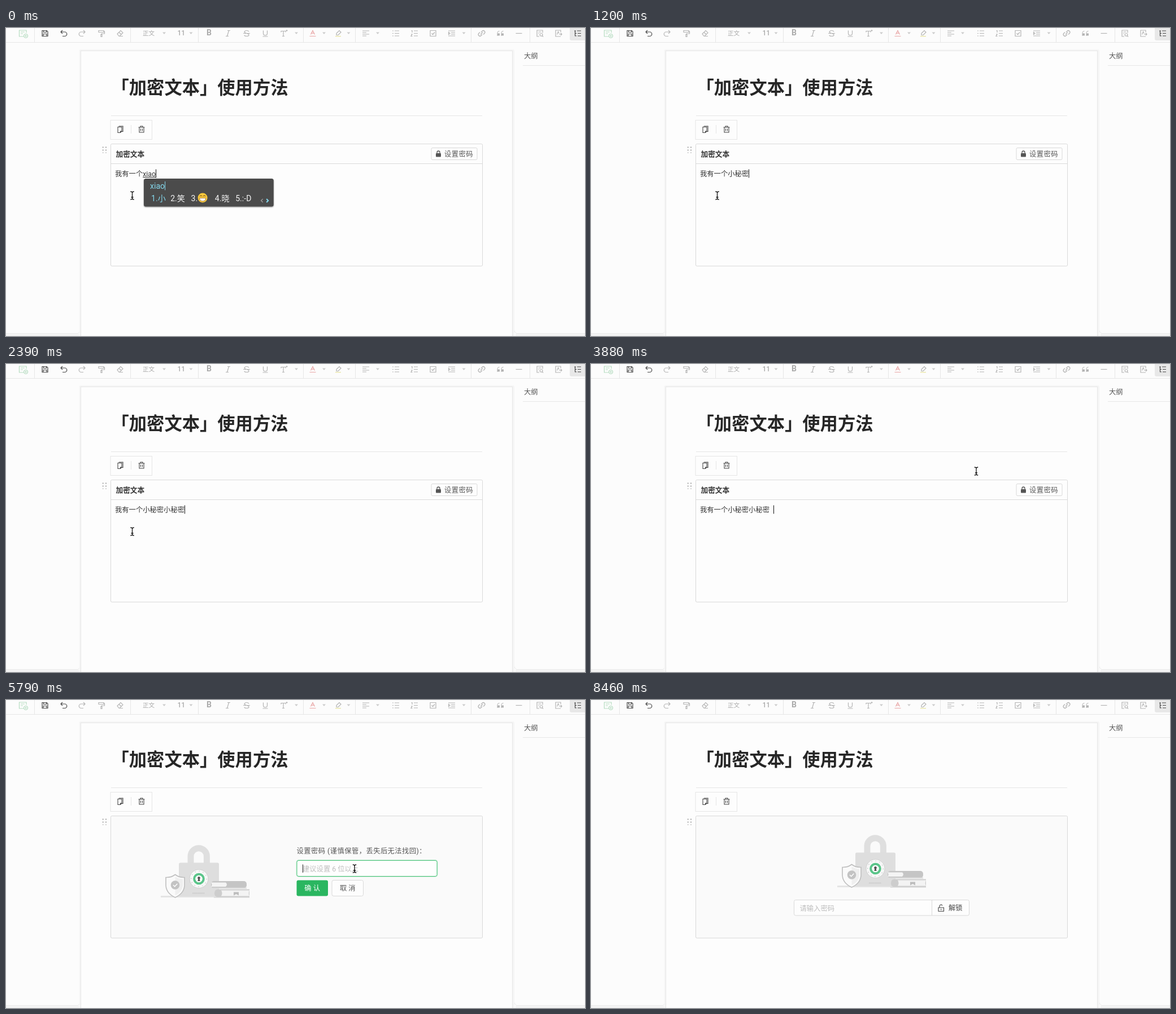
Recreate the animation shown at these times as an HTML page. Size 1025 px wide and 546 px high, loop 9360 ms.

```html
<!DOCTYPE html>
<html lang="zh-CN">
<head>
<meta charset="utf-8">
<style>
html, body { margin: 0; width: 100%; height: 100%; overflow: hidden; background: #fcfcfc; }
svg { display: block; width: 1025px; height: 546px; fill: none;
  font: 12.3px Roboto, "Noto Sans CJK SC", "Noto Sans CJK", sans-serif; }
text { fill: #555; white-space: pre; }
.line { stroke: #e6e6e6; }
.box { stroke: #d9d9d9; }
.dark { stroke: #444; stroke-width: 1.1; }
.hint { fill: #bdbdbd; }
.spaced { letter-spacing: .45px; }
#popup { filter: drop-shadow(0 1px 1px #0007); }
#popup text { font-size: 14.1px; fill: #f6f6f6; }
#popup .on { fill: #85d9ee; }
</style>
</head>
<body>
<svg viewBox="0 0 1025 546">
  <defs>
    <g id="art">
      <path d="M274 348.5H431" stroke="#e4e4e4" stroke-width="3"/>
      <path d="M327 290V277a14.2 14.2 0 0 1 28.4 0V290" stroke="#dfdfdf" stroke-width="11"/>
      <rect x="306" y="288.500" width="71" height="59.500" rx="2.500" fill="#dedede"/>
      <path d="M330 342.500H352" stroke="#cacaca" stroke-width="1.800" stroke-dasharray="1.500 .7"/>
      <circle cx="341.500" cy="317" r="16.500" fill="#f7f7f7" stroke="#cfcfcf"/>
      <circle cx="341.500" cy="317" r="13.800" stroke="#bbb" stroke-width="1.400" stroke-dasharray="1 6.200"/>
      <circle cx="341.500" cy="317" r="8.300" fill="#fff" stroke="#5bc58a" stroke-width="4"/>
      <path d="M341.500 313a2.400 2.400 0 0 1 1.300 4.400l.9 3.600h-4.400l.9-3.600a2.400 2.400 0 0 1 1.300-4.400z" fill="#555"/>
      <path d="M299.500 309.500Q307 315 316 314.500V329Q315 343 299.500 350Q284 343 283 329V314.500Q292 315 299.500 309.500z" fill="#fafafa" stroke="#bfbfbf" stroke-width="1.600"/>
      <path d="M299.500 313Q306 317.500 313 317.500V329Q312 340 299.500 346.500z" fill="#efefef"/>
      <circle cx="299.500" cy="328" r="7.800" fill="#c3c3c3"/>
      <path d="M296 328l2.700 2.700 4.600-4.900" stroke="#fff" stroke-width="1.500"/>
      <rect x="363" y="321" width="63" height="12.500" rx="5" fill="#c5c5c5"/>
      <path d="M363 323.500H389q4 3.500 0 7.500H363q3-3.500 0-7.500z" fill="#f4f4f4"/>
      <path d="M366 333.500H426" stroke="#dcdcdc" stroke-width="2"/>
      <path d="M431 335.500H376q-7 0-7 7t7 7H431" fill="#cdcdcd"/>
      <path d="M431 337.500H381q3 5 0 10H431q-2.500-5 0-10z" fill="#f3f3f3"/>
      <path d="M403 340.500h9v6l-4.500-2.500-4.500 2.500z" fill="#bdbdbd"/>
      <path d="M368 349.700H431" stroke="#d5d5d5" stroke-width="1.500"/>
    </g>
    <path id="beam" d="M-3.200-7Q0-7 0-5Q0-7 3.200-7M0-5V5M-3.200 7Q0 7 0 5Q0 7 3.200 7M-2 3H2" stroke="#111" stroke-width="1.300"/>
    <path id="hand" d="M-1.300 9V1.200a1.300 1.300 0 0 1 2.600 0V6q2-1 2.600.6 2-.7 2.600.7 2-.2 2 1.300V11.500L7 15H1L-3.400 9.700q-.8-1.700.7-1.800zM1.300 6V9M3.900 6.600V9M6.500 7.300V9.500" fill="#fff" stroke="#111" stroke-linejoin="round"/>
    <path id="arrow" d="M0 0V13l3-2.800 1.900 4.600 2-.8-1.900-4.500h4.200z" fill="#111" stroke="#fff" stroke-width=".8"/>
  </defs>

  <rect width="1025" height="546" fill="#fcfcfc"/>
  <path d="M0 25.500H1025" class="line"/>
  <path d="M0 542H129V546H0zM902 542H1025V546H902z" fill="#f4f4f4"/>
  <path d="M0 541.500H127q3-1 4-5M1025 541.500H904q-3-1-4-5" stroke="#ebebeb"/>
  <rect x="131" y="39.500" width="767.500" height="520" rx="1" stroke="#f5f5f5" stroke-width="3"/>
  <rect x="132.500" y="40.500" width="764" height="520" fill="#fdfdfd" class="line"/>
  <g id="tools"></g>
  <text x="917" y="54.300" font-weight="500" fill="#444">大纲</text>
  <path d="M915 66.500H1025M186 155.500H843" class="line"/>
  <text x="186.500" y="117.300" font-size="31.300" font-weight="700" style="fill:#262626">「加密文本」使用方法</text>
  <rect x="185" y="163.500" width="73.500" height="34" class="line"/>
  <path d="M221.500 172V187" class="line"/>
  <path d="M199.500 174h7.500v9.500h-2M205 175.500v7.500l-2.500 2.500h-4.500v-10zM205 183h-2.500v2.500M234.500 176h11M238 176v-2h4v2M236 176v9h8v-9M238.500 178.500v4M241.500 178.500v4" class="dark"/>
  <path d="M171.700 210.500v11M177 210.500v11" stroke="#aaa" stroke-width="2" stroke-dasharray="2 3"/>

  <rect id="panel" x="185.500" y="205.500" width="658" height="216.500" rx="2" class="box"/>
  <g id="editor">
    <path d="M186 240.500H843" class="box"/>
    <text x="194.500" y="228" font-size="12.700" font-weight="700" style="fill:#333">加密文本</text>
    <rect x="753" y="212.500" width="81" height="21" rx="2" class="box"/>
    <rect x="761" y="222" width="9" height="6.500" rx="1" fill="#555"/>
    <path d="M763 222v-1.500a2.500 2.500 0 0 1 5 0V222" stroke="#555" stroke-width="1.300"/>
    <text x="776" y="228" class="spaced">设置密码</text>
    <text id="typed" x="193" y="262.500" style="fill:#333"></text>
    <path id="under" stroke="#222"/>
    <path id="caret" stroke="#111"/>
    <g id="popup"></g>
  </g>
  <g id="setup">
    <use href="#art"/>
    <text x="514.500" y="271.500" class="spaced">设置密码 (谨慎保管，丢失后无法找回)：</text>
    <rect id="glow" x="514.500" y="284" width="249" height="29" rx="4" stroke="#bfe9cf" stroke-width="2"/>
    <rect id="field" x="515" y="284.500" width="248" height="28" rx="3" fill="#fefefe"/>
    <text id="hint" x="525" y="303.500" class="hint">建议设置 6 位以上</text>
    <text id="pass" x="525" y="303.500"></text>
    <path id="passCaret" stroke="#222"/>
    <rect id="ok" x="514.500" y="319.500" width="55.500" height="28" rx="3"/>
    <text x="528.300" y="338" style="fill:#fff">确 认</text>
    <rect x="577" y="319.500" width="55.500" height="28" rx="3" class="box" fill="#fdfdfd"/>
    <text x="591" y="338">取 消</text>
  </g>
  <g id="locked">
    <use href="#art" x="162" y="-18"/>
    <rect x="359.500" y="354.500" width="310" height="27.500" rx="3" fill="#fdfdfd" class="box"/>
    <path d="M603.500 354.500V382" class="box"/>
    <text x="369.500" y="373.500" class="hint">请输入密码</text>
    <path d="M615 368h9.500v6.500H615zM617 368v-2.500a2.600 2.600 0 0 1 5-1M619.700 370v2.500" class="dark"/>
    <text x="633" y="373" font-weight="500" style="fill:#444">解锁</text>
  </g>
  <use id="cursor"/>
</svg>
<script>
const $ = id => document.getElementById(id);
const pale = '#b4b4b4', ink = '#484848';
const tri = 'm-3-1.500h6l-3 3.500z';

// Toolbar icons: centre x, colour, path around the centre
const icons = [
  [30, '#b5dcc0', 'M1 5.500H-6.500V-5.500H6V-1M-4-2.500H3M-4 .5H0M5 1a3.500 3.500 0 1 0 .1 0M5 2.800v3.400M3.300 4.500h3.400'],
  [69, ink, 'M-5-5H3L5-3V5H-5zM-2.500-5v3h5v-3M-3 5V1H3V5'],
  [102, ink, 'M-2-5.500L-5-2.500-2 .5M-5-2.500H2a3.700 3.700 0 0 1 0 7.500H-2'],
  [135, pale, 'M2-5.500L5-2.500 2 .5M5-2.500H-2a3.700 3.700 0 0 0 0 7.500H2'],
  [169, pale, 'M-5-5H4V-2H-5zM4-3.500H5.500V.5H0V2M-1 2H1V6H-1z'],
  [202, pale, 'M-5 1L1-5 5-1-1 5H-2zM-2-2L2 2M-1 5H5'],
  [393, pale, 'M-1-5H4M-4 5H1M1.500-5L-1.500 5'],
  [426, pale, 'M4-3Q3-5 0-5T-4-2.500Q-4-1 0 0T4 2.500Q4 5 0 5T-4 3M-6 0H6'],
  [459, pale, 'M-3.500-5V0a3.500 3.500 0 0 0 7 0V-5M-4.500 5.500H4.500'],
  [492, pale, 'M-5-2V-4H3V-2M-1-4V5M-3 5H1M3.500-5H6.500M5-6.500V-3.500'],
  [543, '#e9a5a5', 'M-3.500 2L0-5 3.500 2M-2.300-.3H2.300M-5.500 5H5.500'],
  [588, pale, 'M-3 0L2-5 5-2 0 3H-3z'],
  [588, '#e6e29a', 'M-5 5.200H5'],
  [637, pale, 'M-6-4.500H6M-6-1.500H1M-6 1.500H6M-6 4.500H1'],
  [690, pale, 'M-2-4.500H6M-2 0H6M-2 4.500H6M-6-4.500h2M-6 0h2M-6 4.500h2'],
  [723, pale, 'M-1-4.500H6M-1 0H6M-1 4.500H6M-5.500-5h1.500v3.500M-6 1.500h2l-2 3.500h2.500'],
  [756, pale, 'M-5-5H5V5H-5zM-2.500 0L-.5 2 3-2'],
  [789, pale, 'M-6-4.500H6M-1-1.500H6M-1 1.500H6M-6 4.500H6M-5.500-2L-3 0-5.500 2z'],
  [842, pale, 'M-1-2L1-4a2.600 2.600 0 0 1 4 4L3 2M1 2L-1 4a2.600 2.600 0 0 1-4-4L-3-2M-2 2L2-2'],
  [908, pale, 'M-5.500 0H5.500'],
  [945, pale, 'M5-1V-5.500H-5V5.500H-1M-2.500-2.500H2.500M-2.500 0H-1M2.500 0a2.400 2.400 0 1 0 .1 0M4 4L6 6'],
  [978, pale, 'M4-2V-5.500H-5V5.500H4M-2.500 2L-.5-3 1 0M1 1.500H6M4-.5L6 1.500 4 3.500'],
  [1012, ink, 'M-6-4.500H-3M-1-4.500H6M-4.500-4.500V4.500H-2M-4.500 0H-2M0 0H6M0 4.500H6']
];
const label = (x, size, weight, s) =>
  `<text x="${x}" y="13.200" font-size="${size}" font-weight="${weight}" style="fill:#aaa">${s}</text>`;
$('tools').innerHTML = '<path d="M998 0H1025V22H1001q-3 0-3-3z" fill="#e8e8e8"/>' +
  [50.5, 220.5, 340.5, 526.5, 618.5, 823.5, 927.5].map(x => `<path class="line" d="M${x} 0V25"/>`).join('') +
  [280, 327.5, 514, 563, 606.5, 658, 810.5].map(x => `<path fill="#ccc" d="M${x} 9${tri}"/>`).join('') +
  icons.map(([x, c, d]) => `<path transform="translate(${x} 9.500)" stroke="${c}" stroke-width="1.200" d="${d}"/>`).join('') +
  label(242, 10.6, 400, '正文') + label(303.5, 12, 500, '11') + label(355, 14, 700, 'B') +
  '<path d="M870 14V8.500q0-3 3.500-3M877 14V8.500q0-3 3.500-3" stroke="#b4b4b4"/>' +
  '<path d="M870 9.500h4v4h-4zM877 9.500h4v4h-4z" fill="#b4b4b4"/>';

const first = '我有一个', secret = '小秘密';
const smile = ['小', '笑', '😁', '晓', ':-D'];
const mi = ['小蜜', '小咪', '小迷', '笑眯眯', '小谜'];
const mimi = [secret, '笑眯眯', '小米米', '小咪咪', '小米'];
// time, committed text, syllables being typed, candidates, caret offset
const typing = [
  [0, first, 'xiao', smile],
  [150, first, "xiao'm", ['小明', '小猫', '小妹', '笑眯眯', '小麦']],
  [300, first, "xiao'mi", mi],
  [750, first, "xiao'mi'mi", mimi],
  [1200, first + secret, ''],
  [1350, first + secret, 'xi', ['系', '洗', '西', '喜', '细']],
  [1500, first + secret, 'xia', ['下', '夏', '吓', '虾', '霞']],
  [1650, first + secret, 'xiao', smile],
  [1800, first + secret, "xiao'mi", mi],
  [2100, first + secret, "xiao'mi'mi", mimi],
  [2390, first + secret + secret, ''],
  [2840, first + secret + secret, '', null, 7.5]
];
// time, pointer shape, x, y
const moves = [
  [0, 'beam', 223.5, 297], [3290, 'beam', 232, 200], [3440, 'beam', 234, 77],
  [3590, 'beam', 335, 121], [3740, 'beam', 493, 140], [3880, 'beam', 682, 190],
  [4030, 'beam', 728, 189], [4170, 'beam', 788, 210], [4320, 'hand', 794, 218],
  [4610, 'beam', 794, 223], [5050, 'beam', 788, 226], [5200, 'beam', 745, 246],
  [5350, 'beam', 680, 280], [5490, 'beam', 630, 296], [5640, 'beam', 617, 299],
  [6090, '', 0, 0], [6830, 'beam', 600, 306], [6980, 'hand', 562, 338],
  [7130, 'hand', 558, 346], [7420, 'arrow', 558, 346], [7870, 'arrow', 606, 364],
  [8020, 'arrow', 806, 477], [8160, 'arrow', 903, 508], [8310, 'arrow', 981, 533],
  [8460, '', 0, 0]
];
const passes = [[0, ''], [6090, '1'], [6540, '11'], [6830, '111']];
const at = (list, t) => list.findLast(k => k[0] <= t);
const show = (id, on) => $(id).style.display = on ? '' : 'none';

function emoji(x) {
  return `<g transform="translate(${x} 301)"><circle r="8.500" fill="#f8c83c"/>
    <path d="M-5-2.500q2-3 4 0M1-2.500q2-3 4 0" stroke="#6b4517" stroke-width="1.200"/>
    <path d="M-5.500 .5H5.500Q5 6 0 6T-5.500 .5z" fill="#fff" stroke="#8a5a20" stroke-width=".7"/></g>`;
}

function popup(left, pre, words) {
  let x = left + 13, end = x, items = '';
  words.forEach((word, i) => {
    const face = word === '😁';
    items += `<text x="${x}" y="307"${i ? '' : ' class="on"'}>${i + 1}.${face ? '' : word}</text>`;
    if (face) items += emoji(x + 20.5);
    const wide = face ? 20 : word === ':-D' ? 20 : word.length * 14.2;
    end = x + wide + 11.5;
    x += wide + (i ? 22.2 : 20);
  });
  const right = end + 36;
  $('popup').innerHTML = `<rect x="${left}" y="267" width="${right - left}" height="49.500" rx="3.500" fill="#4b4b4b"/>
    <text x="${left + 11}" y="284.500" class="on">${pre}</text>${items}
    <path d="M${right - 19} 303l-3 3 3 3" stroke="#999" stroke-width="1.500"/>
    <path d="M${right - 12.5} 303l3 3-3 3" stroke="#85d9ee" stroke-width="2"/>`;
  const caretX = left + 11.5 + $('popup').querySelector('text').getComputedTextLength();
  $('popup').innerHTML += `<path d="M${caretX} 272V287.500" stroke="#85d9ee"/>`;
}

let shown;
function drawTyping(state) {
  if (state === shown) return;
  shown = state;
  const [, done, pre, words, gap = 0] = state, typed = $('typed');
  typed.textContent = done;
  const start = 193 + typed.getComputedTextLength();
  typed.textContent = done + pre;
  const end = 193 + typed.getComputedTextLength();
  $('under').setAttribute('d', pre ? `M${start} 264.500H${end}` : '');
  $('caret').setAttribute('d', `M${Math.round(end + gap) + .5} 250.500V265.500`);
  if (words) popup(start + 1.8, pre, words);
  else $('popup').innerHTML = '';
}

function draw(t) {
  const setup = t >= 4460 && t < 7270, editor = t < 4460, focus = t >= 5790;
  show('editor', editor);
  show('setup', setup);
  show('locked', t >= 7270);
  $('panel').setAttribute('fill', editor ? '#fdfdfd' : '#fafafa');
  if (editor) drawTyping(at(typing, t));

  const [, shape, x, y] = at(moves, t);
  $('cursor').setAttribute('href', '#' + (shape || 'none'));
  $('cursor').setAttribute('transform', `translate(${x} ${y})`);

  if (setup) {
    const pass = at(passes, t)[1];
    $('pass').textContent = pass;
    show('hint', !pass);
    show('glow', focus);
    show('passCaret', focus);
    $('field').setAttribute('stroke', focus ? '#50c57f' : '#d6d6d6');
    $('ok').setAttribute('fill', shape === 'hand' && t > 6900 ? '#38bd6f' : '#2ab660');
    const caretX = Math.round(525 + (pass ? $('pass').getComputedTextLength() : 0)) + .5;
    $('passCaret').setAttribute('d', `M${caretX} 291.500V306`);
  }
}

const begin = performance.now();
function frame() {
  draw((performance.now() - begin) % 9360);
  requestAnimationFrame(frame);
}
frame();
</script>
</body>
</html>
```
